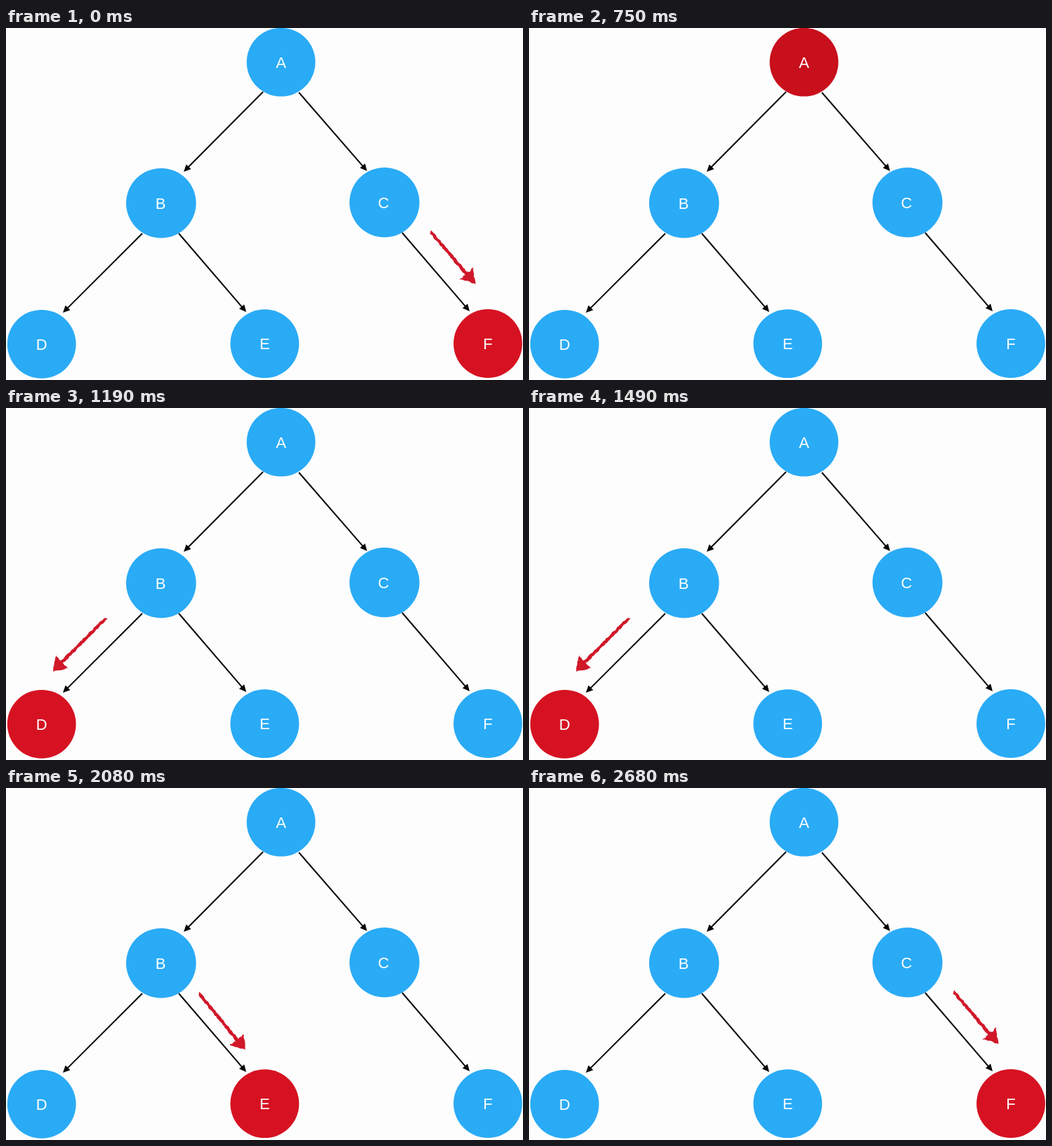
Animation of 736x502 px, one loop 2.78 s. Source, as an HTML page with a canvas:

```html
<!DOCTYPE html>
<html lang="en">
<head>
<meta charset="utf-8">
<title>Depth-first traversal</title>
<style>
  html, body { margin: 0; width: 100%; height: 100%; overflow: hidden; background: #fdfdfd; }
  canvas { display: block; }
</style>
</head>
<body>
<canvas id="stage" width="736" height="502"></canvas>
<script>
const ctx = document.getElementById('stage').getContext('2d');
const LOOP = 2780, BLUE = '#2aabf6', RED = '#d61222';

// x, y, radius, then label x and baseline
const nodes = {
  A: [391.5, 48.7, 48.9, 391.5, 57],
  B: [220.8, 249.7, 49.8, 220, 258],
  C: [538.8, 248.8, 49.8, 537.5, 257],
  D: [50.7, 450.8, 48.9, 50.7, 459],
  E: [368.3, 450.2, 48.9, 368.3, 458],
  F: [686, 450, 48.9, 686, 458]
};

// The highlight sits slightly off two of the nodes
const lit = {
  ...nodes,
  B: [219.7, 250.3, 48.7, 220, 258],
  C: [536.5, 250.3, 48.7, 536.5, 258]
};

const edges = [
  [366, 91, 253, 205], [417, 92, 514, 204],
  [194, 293, 81, 406], [246, 293, 342, 405], [564, 292, 660, 404]
];

// Start time, visited node, hand-drawn arrow leading to it
const steps = [
  [0, 'F', [604, 290, 668, 365]],
  [300, 'A'],
  [900, 'B', [330, 90, 254, 166]],
  [1190, 'D', [143, 299, 66, 376]],
  [1790, 'E', [274, 292, 341, 374]],
  [2230, 'C', [452, 95, 516, 171]],
  [2680, 'F', [604, 290, 668, 365]]
];

function seeded(seed) {
  return () => (seed = seed * 16807 % 2147483647) / 2147483647;
}

function polygon(points, color) {
  ctx.beginPath();
  points.forEach(p => ctx.lineTo(...p));
  ctx.closePath();
  ctx.fillStyle = color;
  ctx.fill();
}

// Draws in a frame whose x axis runs from the tail to the tip
function along([x1, y1, x2, y2], draw) {
  ctx.save();
  ctx.translate(x1, y1);
  ctx.rotate(Math.atan2(y2 - y1, x2 - x1));
  draw(Math.hypot(x2 - x1, y2 - y1));
  ctx.restore();
}

function edge(line) {
  along(line, len => {
    ctx.fillStyle = '#050505';
    ctx.fillRect(0, -1, len - 8, 2);
    polygon([[len, 0], [len - 10, -4.8], [len - 10, 4.8]], '#050505');
  });
}

function crayonArrow(line) {
  const random = seeded(4711);
  const jitter = size => (random() - 0.5) * size;
  along(line, len => {
    const outline = [];
    const side = (x1, y1, x2, y2, size) => {
      const n = Math.ceil(Math.hypot(x2 - x1, y2 - y1) / 2.5);
      for (let i = 0; i < n; i++) {
        outline.push([x1 + (x2 - x1) * i / n + jitter(size), y1 + (y2 - y1) * i / n + jitter(size)]);
      }
    };
    const neck = len - 19;
    side(0, -2.2, neck, -2.4, 1.4);
    side(neck, -2.4, neck - 1, -12.5, 2.6);
    side(neck - 1, -12.5, len, 0, 1.6);
    side(len, 0, neck - 1, 12.5, 1.6);
    side(neck - 1, 12.5, neck, 2.4, 2.6);
    side(neck, 2.4, 0, 2.2, 1.4);
    polygon(outline, '#d01829');
  });
}

function node(name, [x, y, r, labelX, baseline], color) {
  ctx.beginPath();
  ctx.arc(x, y, r, 0, 7);
  ctx.fillStyle = color;
  ctx.fill();
  ctx.fillStyle = '#fff';
  ctx.fillText(name, labelX, baseline);
}

function frame() {
  const t = performance.now() % LOOP;
  const [, active, arrow] = steps.filter(s => s[0] <= t).pop();
  ctx.fillStyle = '#fdfdfd';
  ctx.fillRect(0, 0, 736, 502);
  ctx.font = '22px "Liberation Sans", Arial, sans-serif';
  ctx.textAlign = 'center';
  for (const name in nodes) {
    if (name !== active) node(name, nodes[name], BLUE);
    else node(name, lit[name], name === 'A' ? '#c80f1c' : RED);
  }
  edges.forEach(edge);
  if (arrow) crayonArrow(arrow);
  requestAnimationFrame(frame);
}
frame();
</script>
</body>
</html>
```
